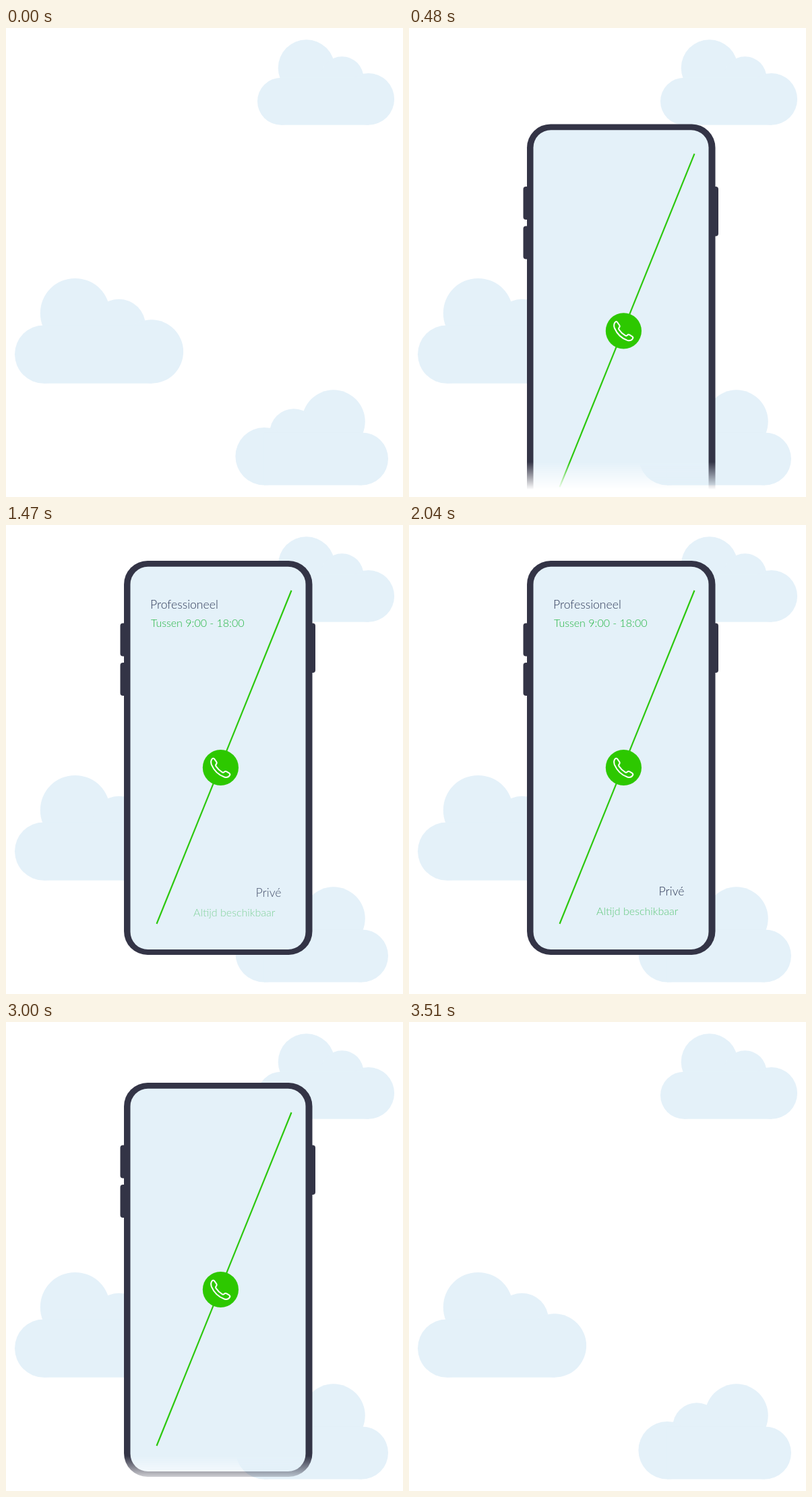
Write an HTML page that moves like this. It is 589 px wide and 695 px high and loops after 3.57 s.

```html
<!DOCTYPE html>
<html lang="nl">
<head>
<meta charset="utf-8">
<title>Bereikbaarheid</title>
<style>
  html, body { margin: 0; width: 100%; height: 100%; overflow: hidden; background: #fff; }
  svg { display: block; width: 100%; height: 100%; }
  text { font-family: Lato, "Open Sans", sans-serif; font-weight: 300; }
  .title { font-size: 17.6px; fill: #2f3a58; }
  .note { font-size: 16px; fill: #22b540; }
</style>
</head>
<body>
<svg viewBox="0 0 589 695">
  <defs>
    <g id="cloud" fill="#e4f1f9">
      <circle cx="72.7" cy="-84.5" r="42"/>
      <circle cx="125.5" cy="-69.5" r="32"/>
      <circle cx="164.8" cy="-38.3" r="38.3"/>
      <circle cx="35" cy="-35" r="35"/>
      <rect x="35" y="-70" width="130" height="70"/>
    </g>
    <linearGradient id="fade" gradientUnits="userSpaceOnUse" x1="0" y1="643" x2="0" y2="684">
      <stop offset="0" stop-color="#fff"/>
      <stop offset="1" stop-color="#fff" stop-opacity="0"/>
    </linearGradient>
    <mask id="floor" maskUnits="userSpaceOnUse" x="0" y="0" width="589" height="695" style="mask-type:alpha">
      <rect width="589" height="695" fill="url(#fade)"/>
    </mask>
  </defs>

  <use href="#cloud" transform="translate(373 143.7)"/>
  <use href="#cloud" transform="translate(13 526.7) scale(1.2315)"/>
  <use href="#cloud" transform="translate(567 677.5) scale(-1.1158 1.1158)"/>

  <g mask="url(#floor)">
    <g id="phone">
      <g fill="#333446">
        <rect x="169.5" y="145.5" width="12" height="49" rx="4"/>
        <rect x="169.5" y="204" width="12" height="49" rx="4"/>
        <rect x="447" y="145.5" width="12" height="73.5" rx="4"/>
        <rect x="175" y="53" width="279.5" height="584" rx="35"/>
      </g>
      <rect x="184.5" y="61.8" width="260" height="567.2" rx="26" fill="#e4f1f9"/>
      <path d="M423.5 97L223.5 591" stroke="#2dc80e" stroke-width="2.2"/>
      <g transform="translate(318.4 359.5)">
        <circle r="26.6" fill="#2dc800"/>
        <path fill="none" stroke="#fff" stroke-width="2" stroke-linejoin="round"
          d="M-12.3-13.2Q-10.6-14.6-9.3-12.8L-6.3-8.6Q-5-6.6-6.6-5Q-8-3.6-6.6-1.6Q-3 3.8 2.4 6.8Q4.2 7.8 5.4 6.4Q6.8 4.8 8.8 5.8L13 8.4Q14.6 9.8 13.4 11.6Q10.6 15.6 5.6 14Q-7.5 9.4-13.6-4.4Q-15.4-10-12.3-13.2Z"/>
      </g>
      <text class="title" x="214" y="123.7">Professioneel</text>
      <text class="note" x="215" y="151">Tussen 9:00 - 18:00</text>
      <text class="title" x="408.5" y="549.3" text-anchor="end">Privé</text>
      <text class="note" x="278" y="574.7">Altijd beschikbaar</text>
    </g>
  </g>
</svg>
<script>
  const LOOP = 3570, STEP = 30, TURN = 1800;
  const RISE = 873, DEPTH = 688;
  const TEXT_START = 690, STAGGER = 180, TEXT_TIME = 480, TEXT_SHIFT = 10;

  const phone = document.getElementById("phone");
  const lines = [...phone.querySelectorAll("text")];
  const clamp = v => Math.min(1, Math.max(0, v));

  // cubic-bezier(.33, 0, .115, 1), solved by bisection
  function ease(x) {
    if (x <= 0 || x >= 1) return clamp(x);
    let lo = 0, hi = 1;
    for (let i = 0; i < 30; i++) {
      const s = (lo + hi) / 2, r = 1 - s;
      if (3 * r * r * s * .33 + 3 * r * s * s * .115 + s * s * s < x) lo = s;
      else hi = s;
    }
    return lo * lo * (3 - 2 * lo);
  }

  function draw(time) {
    // the exit is the entrance played backwards
    const t = time > TURN ? 2 * TURN - time : time;
    const drop = DEPTH * (1 - ease(t / RISE));
    phone.setAttribute("transform", `translate(0 ${drop.toFixed(2)})`);
    lines.forEach((line, i) => {
      const p = clamp((t - TEXT_START - i * STAGGER) / TEXT_TIME);
      line.setAttribute("opacity", p.toFixed(3));
      line.setAttribute("transform", `translate(0 ${(TEXT_SHIFT * (1 - p)).toFixed(2)})`);
    });
  }

  const start = performance.now();
  function tick() {
    const t = (performance.now() - start) % LOOP;
    draw(Math.floor(t / STEP) * STEP);
    requestAnimationFrame(tick);
  }
  draw(0);
  requestAnimationFrame(tick);
</script>
</body>
</html>
```
